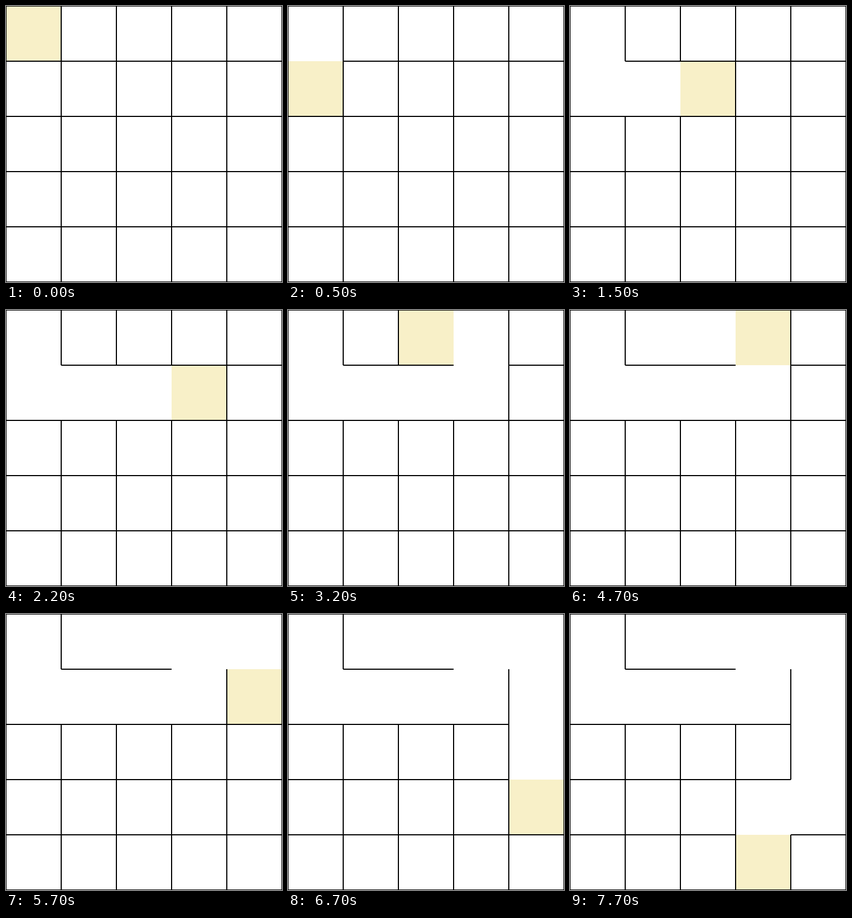
An HTML page with a canvas for the animation above (8 s loop, 500 px wide and 500 px high).

```html
<!DOCTYPE html>
<html lang="en">
<head>
<meta charset="utf-8">
<title>Maze carving</title>
<style>
  html, body { margin: 0; width: 100%; height: 100%; overflow: hidden; background: #fff; }
  canvas { display: block; }
</style>
</head>
<body>
<canvas id="maze" width="500" height="500"></canvas>
<script>
const ctx = document.getElementById('maze').getContext('2d');
const SIZE = 100, COUNT = 5, LOOP = 8000;

// Each step: start time in ms and the direction taken.
const STEPS = [
  [500, 'D'], [1100, 'R'], [1500, 'R'], [2200, 'R'], [2600, 'U'],
  [3200, 'L'], [3700, 'L'], [4200, 'R'], [4700, 'R'], [5200, 'R'],
  [5700, 'D'], [6200, 'D'], [6700, 'D'], [7200, 'L'], [7700, 'D']
];
const MOVES = { U: [0, -1], D: [0, 1], L: [-1, 0], R: [1, 0] };

// A wall is named by its kind and the cell to its right or below it.
const wall = (kind, x, y) => kind + x + y;

function stateAt(time) {
  const open = new Set();
  let x = 0, y = 0;
  for (const [start, dir] of STEPS) {
    if (time < start) break;
    const [dx, dy] = MOVES[dir];
    const nx = x + dx, ny = y + dy;
    open.add(wall(dx ? 'v' : 'h', Math.max(x, nx), Math.max(y, ny)));
    x = nx;
    y = ny;
  }
  return { x, y, open };
}

function draw(time) {
  const { x, y, open } = stateAt(time);
  ctx.fillStyle = '#fff';
  ctx.fillRect(0, 0, 500, 500);
  ctx.fillStyle = '#f8f0c8';
  ctx.fillRect(x * SIZE, y * SIZE, SIZE, SIZE);

  ctx.strokeStyle = '#000';
  ctx.lineWidth = 2;
  ctx.beginPath();
  for (let line = 0; line <= COUNT; line++) {
    for (let i = 0; i < COUNT; i++) {
      const at = line * SIZE, from = i * SIZE, to = from + SIZE;
      if (!open.has(wall('v', line, i))) {
        ctx.moveTo(at, from);
        ctx.lineTo(at, to);
      }
      if (!open.has(wall('h', i, line))) {
        ctx.moveTo(from, at);
        ctx.lineTo(to, at);
      }
    }
  }
  ctx.stroke();
}

const begin = performance.now();
function tick() {
  draw((performance.now() - begin) % LOOP);
  requestAnimationFrame(tick);
}
tick();
</script>
</body>
</html>
```
